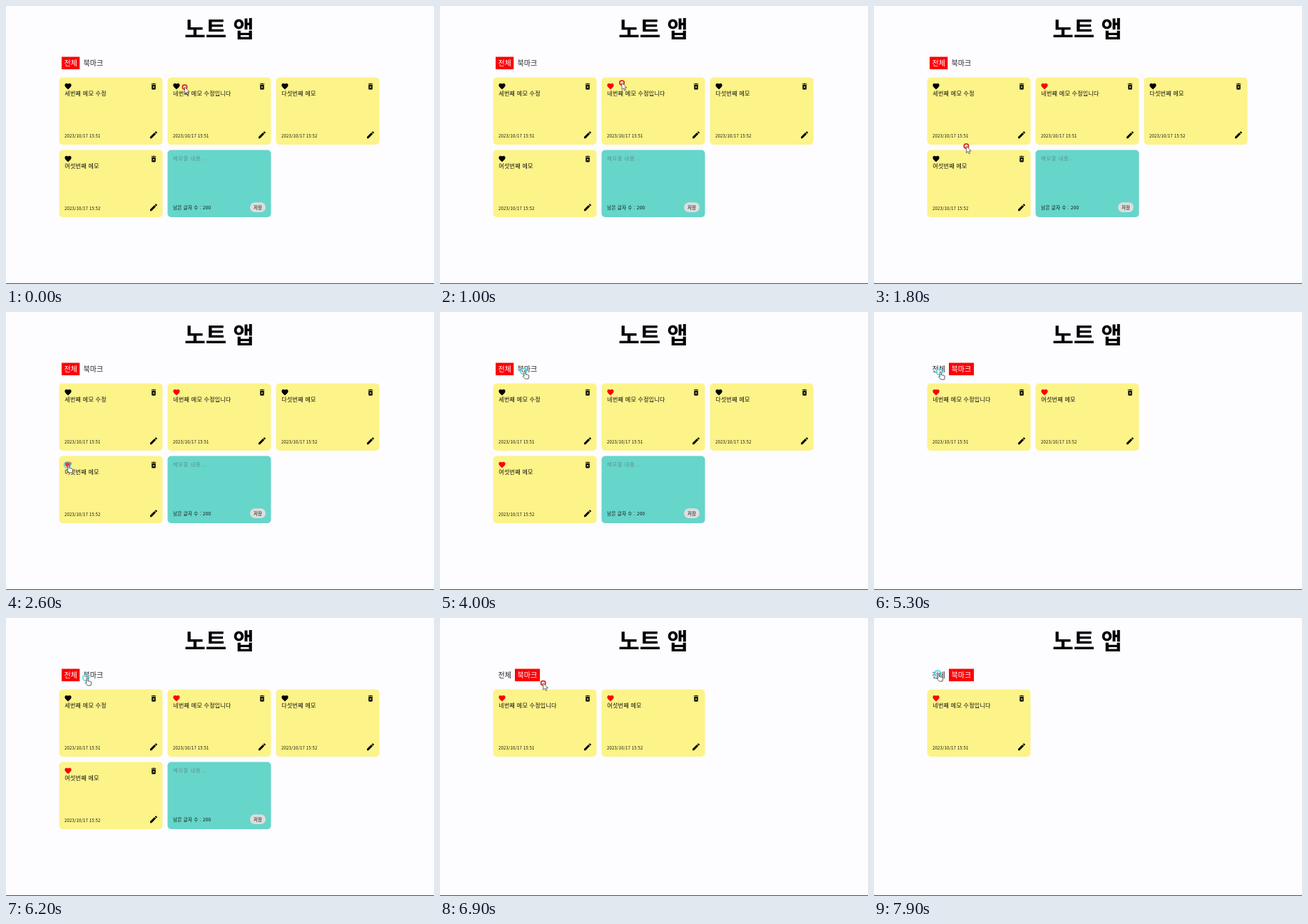
An HTML page that plays this animation: 600 px wide and 391 px high, repeating every 8000 ms.

```html
<!DOCTYPE html>
<html lang="ko">
<head>
<meta charset="utf-8">
<title>노트 앱</title>
<style>
  html, body { margin: 0; width: 100%; height: 100%; overflow: hidden; background: #fdfcff; }
  svg { display: block; width: 600px; height: 391px; }
  text { font-family: "Noto Sans CJK KR", "Noto Sans CJK", sans-serif; fill: #111; }
  .title { font-size: 32px; font-weight: 700; text-anchor: middle; fill: #000; }
  .tab text { font-size: 10px; fill: #222; }
  .tab rect { fill: none; }
  .tab.on rect { fill: #fb0007; }
  .tab.on text { fill: #fff; }
  .memo { font-size: 8px; letter-spacing: .28px; }
  .date { font-size: 6px; letter-spacing: .15px; }
  .hint { font-size: 7px; letter-spacing: .8px; fill: #5d8f8b; }
  .left { font-size: 6.5px; letter-spacing: .25px; font-weight: 500; }
  .save { font-size: 6.5px; text-anchor: middle; }
  .heart.on { fill: #fb0007; }
</style>
</head>
<body>
<svg id="stage" viewBox="0 0 600 391">
  <defs>
    <path id="heart" d="M12 21.3l-1.4-1.3C5.4 15.4 2 12.3 2 8.5 2 5.4 4.4 3 7.5 3c1.7 0 3.4.8 4.5 2.1C13.1 3.8 14.8 3 16.5 3 19.6 3 22 5.4 22 8.5c0 3.8-3.4 6.9-8.6 11.5z"/>
    <g id="trash">
      <path d="M5 3h4l1-1h4l1 1h4v2.500H5zM6 7h12v12a2 2 0 0 1-2 2H8a2 2 0 0 1-2-2z"/>
      <path d="M9.300 11l5.400 6M14.700 11l-5.400 6" stroke="#fcf389" stroke-width="1.800"/>
    </g>
    <path id="pencil" d="M3 17.200V21h3.800L17.800 9.900 14 6.200zM20.700 7a1 1 0 0 0 0-1.400l-2.300-2.300a1 1 0 0 0-1.400 0l-1.900 1.800 3.800 3.800z"/>
  </defs>
  <rect width="600" height="391" fill="#fdfcff"/>
  <rect y="390" width="600" height="1" fill="#4c4c50"/>
  <text class="title" x="299" y="43.500">노트 앱</text>
  <g class="tab"><rect x="78" y="71.500" width="25.300" height="17.500"/><text x="81.500" y="83.800">전체</text></g>
  <g class="tab"><rect x="105" y="71.500" width="35" height="17.500"/><text x="108.600" y="83.800">북마크</text></g>
  <g id="cards"></g>
  <g id="cursor">
    <g id="arrow">
      <circle r="3.100" fill="#fff" fill-opacity=".5" stroke="#d93a2b" stroke-width="2"/>
      <path d="M0 0v9.500l2.200-2 1.500 3.300 1.600-.7-1.500-3.200h3z" fill="#fff" stroke="#333" stroke-width=".7"/>
    </g>
    <g id="hand">
      <circle r="4.300" fill="#fff" fill-opacity=".2" stroke="#4fd5df" stroke-opacity=".8" stroke-width="2"/>
      <path d="M.8 7V1a1 1 0 0 1 2 0v3.500l3.700.8q1.300.3 1.200 1.700L7 11H2.500L-.8 7.500q0-1.300 1.600-.5z" fill="#fff" stroke="#333" stroke-width=".8"/>
    </g>
  </g>
</svg>
<script>
const LOOP = 8000, STEP = 100;
const $ = id => document.getElementById(id);

const memos = [
  { text: '세번째 메모 수정', time: '15:51', liked: [] },
  { text: '네번째 메모 수정입니다', time: '15:51', liked: [500, LOOP] },
  { text: '다섯번째 메모', time: '15:52', liked: [] },
  { text: '여섯번째 메모', time: '15:52', liked: [2500, 7200] },
];
const bookmarkViews = [[4200, 5400], [6300, LOOP]];

// time, x, y of the pointer's hot spot
const path = [
  [0, 250.5, 114], [200, 239, 114], [700, 239, 114], [1000, 255, 108],
  [1300, 190, 172], [2200, 86, 215], [2700, 86, 215], [3100, 186, 196],
  [3200, 202, 195], [3800, 117, 83], [4400, 117, 83], [4800, 91.5, 84],
  [5600, 91.5, 84], [6000, 112, 84], [6800, 112, 84], [7100, 238, 113],
  [7300, 238, 113], [7700, 89, 78], [LOOP, 89, 78],
];

const within = (t, [from, to]) => t >= from && t < to;
const slot = i => [74.5 + 152 * (i % 3), 100.5 + 102 * Math.floor(i / 3)];
const icon = (id, x, y, scale, cls = '') =>
  `<use href="#${id}" class="${cls}" transform="translate(${x} ${y}) scale(${scale}) translate(-12 -12)"/>`;
const panel = color => `<rect width="145" height="94.5" rx="5" fill="${color}"/>`;

const memoCard = m => `<g>${panel('#fcf389')}
  ${icon('heart', 12.5, 12.5, .46, 'heart')}${icon('trash', 132.5, 12.8, .46)}${icon('pencil', 132.5, 80.7, .55)}
  <text class="memo" x="7.8" y="25.6">${m.text}</text>
  <text class="date" x="7.6" y="84.5">2023/10/17 ${m.time}</text></g>`;
const newCard = `<g>${panel('#66d5ca')}
  <text class="hint" x="7.8" y="14.5">메모할 내용...</text>
  <text class="left" x="7.8" y="83.3">남은 글자 수 : 200</text>
  <rect x="115.5" y="73.7" width="22" height="13.8" rx="6.9" fill="#dedddd"/>
  <text class="save" x="126.5" y="83">저장</text></g>`;

$('cards').innerHTML = memos.map(memoCard).join('') + newCard;
const cards = [...$('cards').children];
const tabs = document.querySelectorAll('.tab');

function pointerAt(t) {
  const i = path.findIndex(p => p[0] > t);
  const [t0, x0, y0] = path[i - 1], [t1, x1, y1] = path[i];
  const u = (t - t0) / (t1 - t0), k = u * u * (3 - 2 * u);
  return [x0 + (x1 - x0) * k, y0 + (y1 - y0) * k];
}

function draw(t) {
  const marked = bookmarkViews.some(v => within(t, v));
  tabs[0].classList.toggle('on', !marked);
  tabs[1].classList.toggle('on', marked);

  const [px, py] = pointerAt(t);
  let hand = py < 90 && px > 78 && px < 140;
  let place = 0;
  cards.forEach((card, i) => {
    const memo = memos[i];
    const liked = !!memo && within(t, memo.liked);
    const shown = !marked || liked;
    card.style.display = shown ? '' : 'none';
    if (!shown) return;
    const [x, y] = slot(place++);
    card.setAttribute('transform', `translate(${x} ${y})`);
    if (!memo) return;
    card.querySelector('.heart').classList.toggle('on', liked);
    hand ||= Math.hypot(px - x - 12.5, py - y - 12.5) < 7;
  });

  $('cursor').setAttribute('transform', `translate(${px} ${py})`);
  $('hand').style.display = hand ? '' : 'none';
  $('arrow').style.display = hand ? 'none' : '';
}

const start = performance.now();
function tick() {
  const t = (performance.now() - start) % LOOP;
  draw(Math.floor(t / STEP) * STEP);
  requestAnimationFrame(tick);
}
tick();
</script>
</body>
</html>
```
